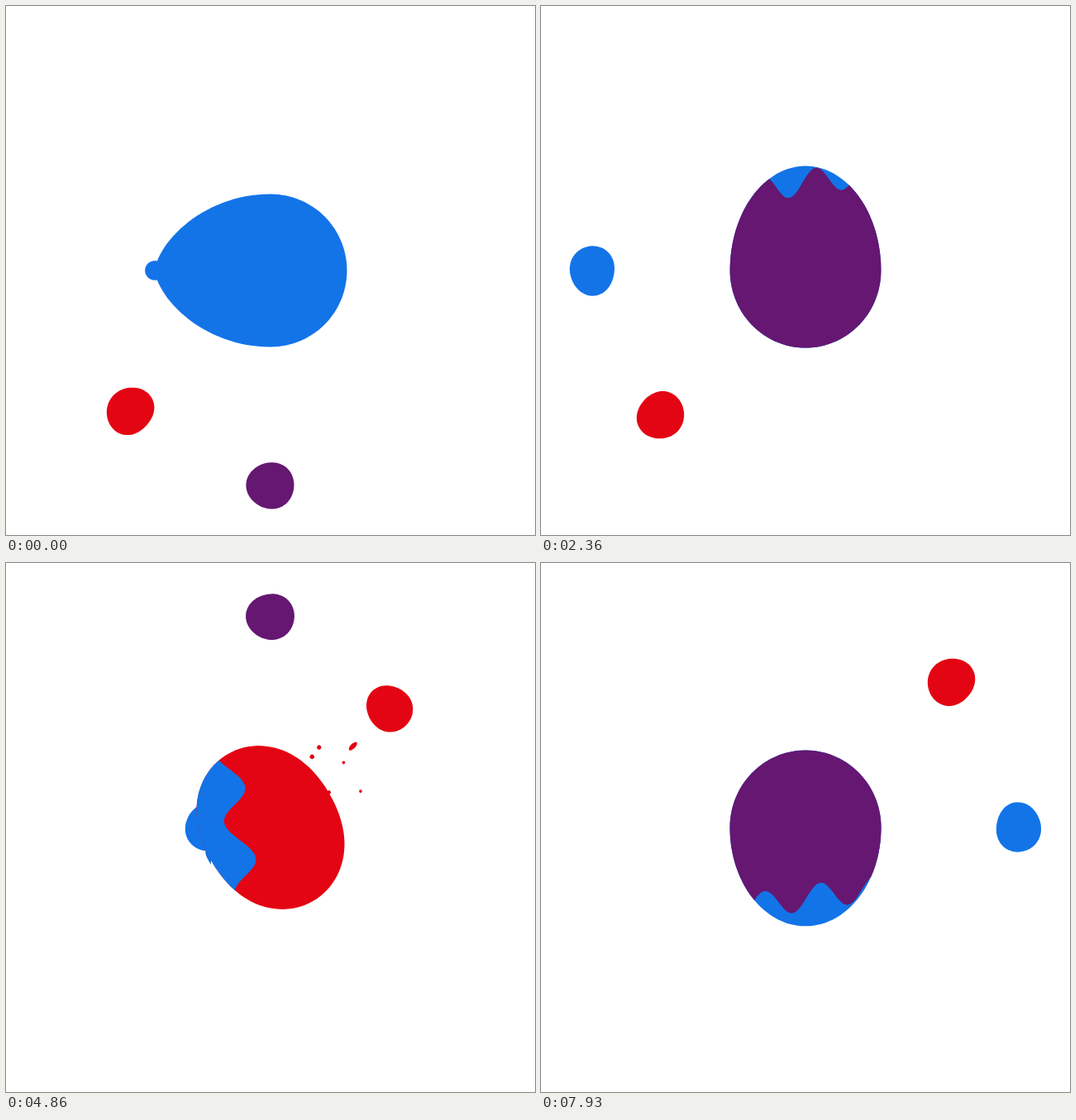
Write an HTML page that moves like this. It is 640 by 640 pixels and loops after 8 s.

```html
<!DOCTYPE html>
<html lang="en">
<head>
<meta charset="utf-8">
<title>Drops</title>
<style>
  html, body { margin: 0; width: 100%; height: 100%; overflow: hidden; background: #fff; }
  svg { display: block; width: 100%; height: 100%; }
</style>
</head>
<body>
<svg viewBox="0 0 640 640">
  <defs><clipPath id="inside"><path id="clip"/></clipPath></defs>
  <g id="drops"></g>
  <g id="ball">
    <path id="body"/>
    <path id="wipe" clip-path="url(#inside)"/>
  </g>
</svg>
<script>
const LOOP = 8000, HALF = 5610, R = 92.5, TIP = 140;
// Each drop crosses the ball along `angle`, and comes back the other way half a turn later.
const DROPS = [
  { color: '#651772', angle: -90, hit: 1975, exit: 2786 },
  { color: '#e30513', angle: -45, hit: 3390, exit: 4250 },
  { color: '#1374e8', angle: 0, hit: 4750, exit: HALF }
];
// Spray left behind an exit: along, across, radius
const SPECKS = [[118, -27, 2.3], [104, -25, 2.4], [126, 7, 1.6], [116, 46, 1.6], [88, 20, 2]];

const { PI, cos, sin, exp, min, max, abs, floor, sqrt } = Math;
const smooth = x => { x = max(0, min(1, x)); return x * x * (3 - 2 * x); };
const $ = id => document.getElementById(id);
const add = (tag, parent) => parent.appendChild(document.createElementNS('http://www.w3.org/2000/svg', tag));
const set = (el, attrs) => { for (const k in attrs) el.setAttribute(k, attrs[k]); };
const place = (el, angle) => set(el, { transform: `translate(320 320) rotate(${angle})` });
const fix = p => p.map(c => c.toFixed(2)).join(' ');
const outline = pts => 'M' + pts.map(fix).join('L') + 'Z';
const ring = (n, f) => outline(Array.from({ length: n }, (_, i) => f(i / n * 2 * PI)));

const views = DROPS.map(d => {
  const g = add('g', $('drops'));
  g.setAttribute('fill', d.color);
  return {
    g, blob: add('path', g), link: add('path', g), streak: add('ellipse', g),
    specks: SPECKS.map(() => add('circle', g))
  };
});

// Crossing number j, counted through all drops
function crossing(j) {
  const n = floor(j / 3), d = DROPS[j - 3 * n];
  return { color: d.color, angle: d.angle + 180 * n, hit: d.hit + n * HALF, exit: d.exit + n * HALF };
}

function last(t, key) {
  let j = 8;
  while (crossing(j)[key] > t) j--;
  return j;
}

// The ball swings back after a drop has left, e ms ago.
const recoil = e => e < 250 ? 0 : .15 * sin(PI * (e - 250) / 950) * exp((250 - e) / 1000);
const tipAfter = e => TIP - (TIP - R) * smooth(e / 350);

function drawBall(t) {
  const j = last(t, 'hit'), now = crossing(j), past = crossing(last(t, 'exit'));
  const w = t - now.hit, e = t - now.exit;
  const tip = e < 0 ? R + (TIP - R) * smooth((w - 130) / 410) : tipAfter(e);
  const pinch = .3 * (e < 0 ? smooth((w - 400) / 420) : 1 - smooth(e / 350));
  const swing = recoil(t - past.exit), turn = (past.angle - now.angle) * PI / 180;
  const dent = w < 300 ? .06 * sin(PI * w / 300) : 0;
  const d = ring(120, a => {
    const r = R * (1 - swing * cos(2 * (a - turn)) - dent * cos(2 * a));
    const u = r * cos(a), v = r * sin(a);
    return u > 0 ? [u * tip / R, v * abs(sin(a)) ** pinch] : [u, v];
  });
  const full = w > 480;
  place($('ball'), now.angle);
  set($('clip'), { d });
  set($('body'), { d, fill: full ? now.color : crossing(j - 1).color });

  // The new colour floods the ball behind a wavy front.
  const front = .53 * w - 98, height = 16 * smooth(w / 110);
  const shift = 47 - .09 * w, length = 95 - .08 * w;
  const edge = [[-220, -130]];
  for (let v = -130; v <= 130; v += 4) {
    edge.push([front + height * cos(2 * PI * (v - shift) / length) + .15 * v, v]);
  }
  edge.push([-220, 130]);
  set($('wipe'), { d: full ? '' : outline(edge), fill: now.color });
}

// Liquid bridge between ball and drop
function bridge(e, h, dist, r) {
  if (e < 270) {
    const n = 11 * (1 - e / 270), from = tipAfter(e) - 16, mid = (from + dist) / 2;
    return `M${fix([from, -n - 4])}Q${fix([mid, -n, dist, -n])}V${n}Q${fix([mid, n, from, n + 4])}Z`;
  }
  if (h > -30 && h < 150) {
    const s = r * .92;
    return `M72 -45Q${fix([84, -s, dist, -s])}V${s}Q${fix([84, s])} 72 45Z`;
  }
  return '';
}

function drawSpray({ streak, specks }, e) {
  const age = e - 270, seen = age > 0;
  const long = seen ? 8 * sqrt(max(0, 1 - age / 1030)) : 0;
  set(streak, { cx: 165 - 70 * exp(-age / 330), cy: 1, rx: long, ry: long * .45 });
  const fade = seen ? 1.35 * max(0, 1 - (age / 870) ** 2) : 0;
  SPECKS.forEach(([u, v, r], i) => set(specks[i], { cx: u + 3 - 60 * exp(-age / 200), cy: v, r: r * fade }));
}

function drawDrop(t, i) {
  const view = views[i], d = DROPS[i];
  const n = floor((t - d.exit) / HALF);
  // Time since leaving the ball, and since (or until) hitting it again
  const e = t - d.exit - n * HALF, h = t - d.hit - (n + 1) * HALF;
  view.g.style.display = h > 280 ? 'none' : '';
  place(view.g, d.angle + 180 * n);

  const dist = max(75, 268 - 128 * exp(-e / 890) - 163 * exp(h / 470));
  const r = (28.6 - 17 * exp(-e / 180)) * (1 - smooth((h - 110) / 170));
  const grown = min(1, e / 600);
  const stretch = .055 * grown * cos(2 * PI * (e - 1380) / 2050), wobble = .02 * grown;
  set(view.blob, {
    d: ring(60, a => {
      const k = r * (1 + stretch * cos(2 * a) + wobble * cos(3 * a - e * .004 + i));
      return [dist + k * cos(a), k * sin(a)];
    })
  });
  set(view.link, { d: bridge(e, h, dist, r) });
  drawSpray(view, e);
}

function draw(t) {
  drawBall(t);
  DROPS.forEach((_, i) => drawDrop(t, i));
}

const start = performance.now();
function tick() {
  draw((performance.now() - start) % LOOP);
  requestAnimationFrame(tick);
}
tick();
</script>
</body>
</html>
```
